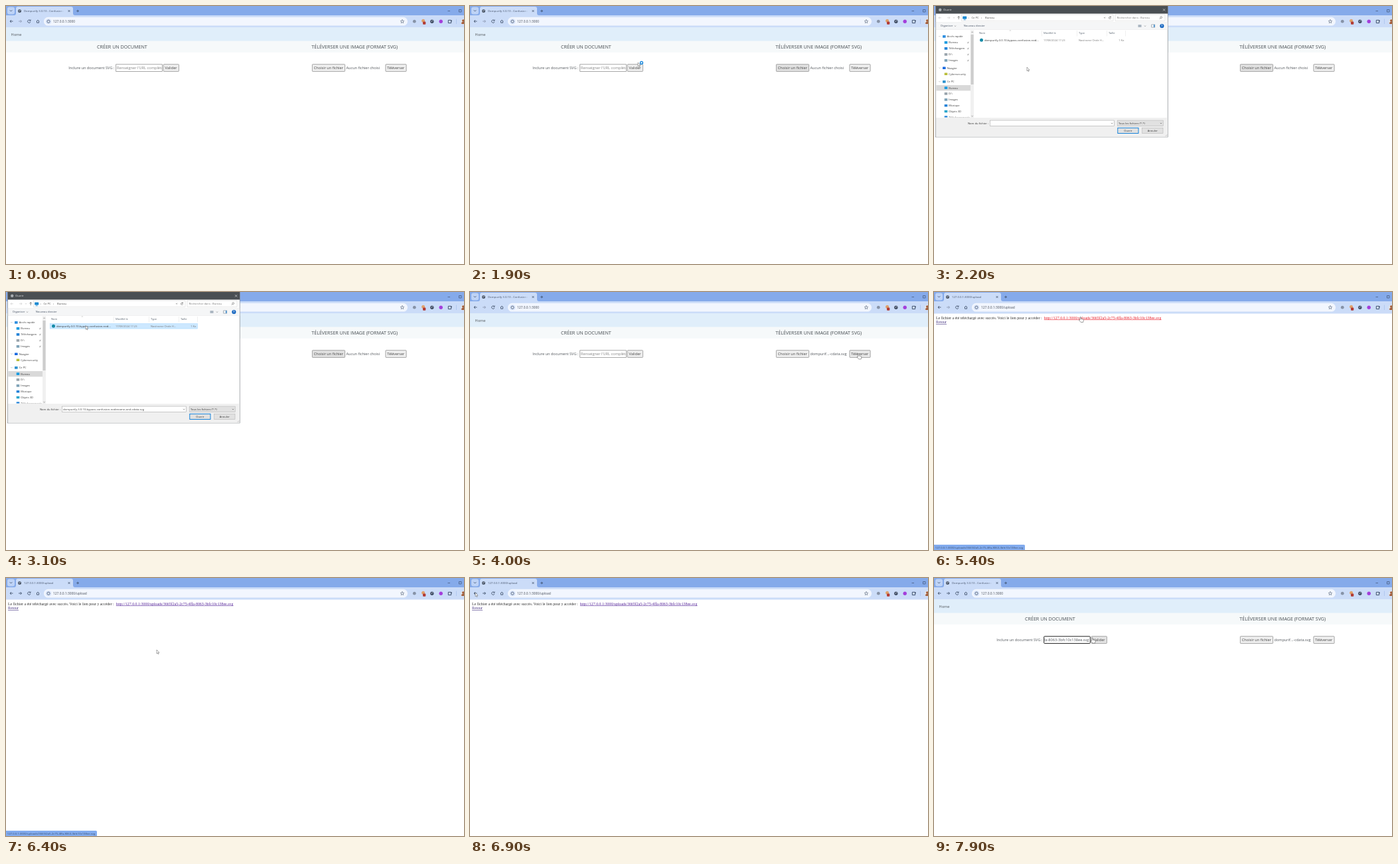
Animation, 690 px wide and 388 px high, one loop 8000 ms. Source, as an HTML page:

```html
<!DOCTYPE html>
<html lang="fr">
<head>
<meta charset="utf-8">
<title>Upload SVG</title>
<style>
html, body { margin: 0; width: 100%; height: 100%; overflow: hidden; background: #fff; }
svg { display: block; font-family: "Open Sans", "Noto Sans", sans-serif; }
.serif { font-family: "Liberation Serif", "Times New Roman", serif; }
</style>
</head>
<body>
<svg id="stage" width="690" height="388" viewBox="0 0 690 388"></svg>
<script>
const LOOP = 8000, STEP = 100;
const stage = document.getElementById('stage');
const HOST = '127.0.0.1:3000';
const FILE = HOST + '/uploads/3665f2a5-2c75-4ffa-8063-3bfc10c138ee.svg';
const INK = '#50555a';

// Drawing helpers; text is placed by its left edge and vertical middle
const rect = (x, y, w, h, fill, more = '') =>
  `<rect x="${x}" y="${y}" width="${w}" height="${h}" fill="${fill}" ${more}/>`;
const dot = (x, y, r, fill, more = '') =>
  `<circle cx="${x}" cy="${y}" r="${r}" fill="${fill}" ${more}/>`;
const line = (d, color = '#3c4450', w = 0.8, more = '') =>
  `<path d="${d}" fill="none" stroke="${color}" stroke-width="${w}" ${more}/>`;
const text = (x, y, str, size, fill = INK, more = '') =>
  `<text x="${x}" y="${y + size * 0.36}" font-size="${size}" fill="${fill}" ${more}>${str}</text>`;
const clip = (id, x, y, w, h) => `<clipPath id="${id}">${rect(x, y, w, h, '#000')}</clipPath>`;
const within = (t, a, b) => t >= a && t < b;

const DEFS = '<defs>' + clip('tab', 26, 0, 62, 14) + clip('field', 166.3, 86, 68.4, 14) +
  clip('side', 3, 36, 52, 131.5) + clip('bar', 70, 16, 510, 15) +
  '<linearGradient id="fade"><stop offset="0" stop-color="#cbdcf8" stop-opacity="0"/>' +
  '<stop offset="1" stop-color="#cbdcf8"/></linearGradient></defs>';

// Cursor path: time, x, y
const PATH = [
  [500, 610, 236], [1300, 487, 92], [1400, 487, 92], [1900, 253, 85],
  [2200, 140, 92], [2700, 120, 50.5], [3100, 120, 50.5], [4000, 584.5, 93],
  [4500, 584.5, 93], [5200, 220, 37.5], [6200, 220, 37.5], [6300, 227, 108],
  [6500, 227, 108], [6900, 8, 22], [7000, 8, 22], [7400, 203, 94],
  [7600, 203, 94], [7700, 222, 131], [7900, 237.8, 90]
];

function cursorAt(t) {
  const i = PATH.findIndex(p => p[0] > t);
  if (i < 0) return PATH[PATH.length - 1].slice(1);
  const [a, b] = [PATH[i - 1], PATH[i]];
  const k = (t - a[0]) / (b[0] - a[0]), e = k * k * (3 - 2 * k);
  return [a[1] + (b[1] - a[1]) * e, a[2] + (b[2] - a[2]) * e];
}

function cursor(t) {
  if (t < 500) return '';
  const [x, y] = cursorAt(t);
  const hand = within(t, 3900, 4100) || within(t, 5200, 5500) || within(t, 6000, 6200) || t >= 7900;
  let art;
  if (within(t, 7400, 7700)) {
    art = line('M-1.2-3H1.2M0-3V3M-1.2 3H1.2', '#333', 0.5);
  } else if (hand) {
    art = '<path d="M0 .2Q.8-.5 1.5.3V3L4.6 3.6Q5.5 4 5.3 5L4.7 8H1.2L-1.6 4.8Q-1.4 3.8-.1 4.6Z" ' +
      'fill="#fff" stroke="#444" stroke-width=".5"/>';
  } else {
    art = '<path d="M0 0V5.7L1.3 4.5 2.2 6.5 3.1 6.1 2.3 4.2H4Z" fill="#fff" stroke="#444" stroke-width=".45"/>';
    if (within(t, 1400, 2000)) art += dot(5.4, 0.4, 2, '#d6efff', 'stroke="#1583d8" stroke-width="1.3"');
  }
  return `<g transform="translate(${x.toFixed(2)} ${y.toFixed(2)})">${art}</g>`;
}

function globe(x, y, r, color) {
  return dot(x, y, r, color) +
    line(`M${x - r * 0.6} ${y - r * 0.2}l${r * 0.7} ${r * 0.4}M${x} ${y - r * 0.6}l${r * 0.6} ${r * 0.3}`, '#dfe9fa', 0.7);
}

function browser(title, url, forward) {
  const dark = '#34445e';
  return rect(0, 0, 690, 15, '#85aaea') + rect(2, 1.5, 11, 11, '#bed3f6', 'rx="3"') +
    line('M5.8 6.3L7.5 8 9.2 6.3', dark) +
    '<path d="M12 14Q15 14 15 11V4Q15 1 18 1H98Q101 1 101 4V11Q101 14 104 14Z" fill="#cbdcf8"/>' +
    rect(0, 14, 690, 18.5, '#cbdcf8') + globe(20.5, 7.5, 2.5, '#4a5566') +
    text(27, 7.5, title, 4.25, '#46536a', 'clip-path="url(#tab)"') +
    rect(80, 2, 8, 11, 'url(#fade)') +
    line('M93.5 6L96.5 9M96.5 6L93.5 9', dark, 0.7) + line('M106.2 7.5H110M108.1 5.6V9.4', dark, 0.7) +
    line('M665.5 7.5H669', dark, 0.6) + line('M682.5 5.5H686V9H682.5Z', dark, 0.6) +
    line('M10.5 23H6M8 21L6 23 8 25', dark) +
    line('M19 23H23.5M21.5 21L23.5 23 21.5 25', forward ? dark : '#8794ab') +
    line('M36.6 21.8A2.2 2.2 0 1 0 36.9 23.8M37 20.4V22.2H35.2', dark) +
    line('M46 23L48 21 50 23M46.5 22.7V25.2H49.5V22.7', dark) +
    rect(57, 16.8, 548, 12.8, '#f2f6fe', 'rx="6.4"') +
    dot(64, 23.2, 4.3, '#d9e5fa') + dot(64, 23.2, 2.1, 'none', 'stroke="#59667c" stroke-width=".9"') +
    text(71, 23.2, url, 4.88, '#454c57', 'clip-path="url(#bar)"') +
    line('M597 20.4L597.8 22.2 599.7 22.4 598.3 23.7 598.7 25.6 597 24.6 595.3 25.6 595.7 23.7 594.3 22.4 596.2 22.2Z', '#4c596f', 0.6) +
    dot(615.3, 23.2, 2.4, '#8793a7') + dot(628.6, 22.2, 2.5, '#dfa16d') +
    rect(628, 23.6, 4.3, 4.2, '#b23a33', 'rx="1"') +
    globe(641.8, 23.2, 2.7, '#3e4b61') + dot(655.2, 23.2, 2.7, '#a43fdb') +
    line('M666.3 21.3H670.7V25.6H666.3Z', dark, 0.9) + dot(671, 22.4, 0.8, dark) +
    line('M678.5 19.5V27', '#9fbbe9', 0.6) +
    dot(688.8, 23.4, 4, '#dfe3e8') + dot(688.8, 22, 1.8, '#a35b37') +
    '<path d="M685.6 25.8Q688.8 22.6 690 24V27H687Z" fill="#a35b37"/>';
}

const button = (x, w, label, fill, size = 5.6) =>
  rect(x + 0.4, 87.7, w - 0.8, 10.7, fill, 'stroke="#858585" stroke-width=".7" rx=".7"') +
  text(x + 2.8, 93.2, label, size, '#444');

function home(t) {
  const pasted = t >= 7800, focus = t >= 7500;
  const chosen = t >= 3300;
  return rect(0, 32.3, 690, 20.5, '#e0eefa') + rect(0, 52.8, 690, 17, '#f6f9fa') +
    text(7.5, 42.8, 'Home', 5.65) +
    text(137, 61.8, 'CRÉER UN DOCUMENT', 7.15, '#484e53') +
    text(460.3, 61.8, 'TÉLÉVERSER UNE IMAGE (FORMAT SVG)', 7.13, '#484e53') +
    text(94.2, 93.2, 'Inclure un document SVG :', 5.62) +
    rect(165.7, 87.8, 69.6, 10.6, '#fff',
      focus ? 'stroke="#222" stroke-width="1" rx=".8"' : 'stroke="#858585" stroke-width=".7"') +
    (pasted
      ? text(233.4, 93.2, 'http://' + FILE, 5.63, INK, 'text-anchor="end" clip-path="url(#field)"')
      : text(167, 93.2, 'Renseigner l’URL complète', 5.68, '#858585', 'clip-path="url(#field)"')) +
    button(236.8, 24, 'Valider', t >= 7900 ? '#e4e4e4' : '#efefef') +
    button(461, 50, 'Choisir un fichier', within(t, 1300, 3300) ? '#e1e1e1' : '#efefef') +
    text(512.5, 93.2, chosen ? 'dompurif...-cdata.svg' : 'Aucun fichier choisi', 5.6) +
    button(571.5, 32, 'Téléverser', within(t, 3900, 4100) ? '#e9e9e9' : '#efefef', 5.45);
}

function upload(t) {
  const color = t < 5400 ? '#1a1aee' : t < 5500 ? '#e8202c' : '#5a2a9c';
  const under = 'class="serif" text-decoration="underline"';
  const status = t === 5400 || within(t, 6000, 6600);
  return text(3, 38.4, 'Le fichier a été téléchargé avec succès. Voici le lien pour y accéder :', 5.87, '#333', 'class="serif"') +
    text(165.8, 38.4, 'http://' + FILE, 5.9, color, under) +
    text(3, 45, 'Retour', 5.88, '#4c3a86', under) +
    (status ? '<path d="M0 380H135.5Q137 380 137 381.5V388H0Z" fill="#82abee"/>' +
      text(1.8, 384.3, FILE, 4.24, '#3d5474') : '');
}

function menu(x, y, w, items, hot) {
  const row = 13;
  return rect(x, y, w, items.length * row, '#fff', 'stroke="#c6cbd3" stroke-width=".6" rx="2"') +
    items.map((s, i) =>
      (i === hot ? rect(x + 0.4, y + i * row, w - 0.8, row, '#e6e9ed') : '') +
      text(x + 8, y + (i + 0.5) * row, s, 4.3, '#333')).join('');
}

const LINK_MENU = ['Ouvrir le lien dans un nouvel onglet', 'Ouvrir le lien dans une nouvelle fenêtre',
  'Ouvrir le lien en navigation privée', 'Envoyer le lien à vos appareils',
  'Enregistrer le lien sous...', 'Copier l’adresse du lien', 'Inspecter'];
const FIELD_MENU = ['Emoji', 'Annuler', 'Coller', 'Coller en texte brut', 'Tout sélectionner',
  'Orthographe', 'Inspecter'];

// Sidebar: label, middle, indent, icon colour
const PLACES = [
  ['Accès rapide', 46, 0, '#2f8fe0'], ['Bureau', 55, 1, '#1a9be0'], ['Téléchargem', 64, 1, '#2583d8'],
  ['D:\\', 73, 1, '#9aa5ad'], ['Images', 82, 1, '#7fa3b8'], ['Nuagier', 93.4, 0, '#1769e0'],
  ['Cybersecurity', 102.4, 1, '#b9bd3a'], ['Ce PC', 114, 0, '#2f93cf'], ['Bureau', 123.2, 1, '#1a9be0'],
  ['D:\\', 132, 1, '#9aa5ad'], ['Images', 141, 1, '#7fa3b8'], ['Musique', 149.8, 1, '#2583d8'],
  ['Objets 3D', 158.6, 1, '#2ba6cc'], ['Téléchargements', 167.2, 1, '#2583d8']
];

function sidebar() {
  return '<g clip-path="url(#side)">' + rect(3.5, 119, 51.5, 8.4, '#d9d9d9') +
    PLACES.map(([label, y, sub, color], i) => {
      const x = sub ? 18 : 15.3;
      return rect(x - 2.3, y - 1.9, 4.6, 3.6, color, 'rx=".5"') +
        (sub ? '' : line(`M7.4 ${y - 0.8}l1 1 1-1`, '#888', 0.5)) +
        text(sub ? 22.3 : 19.8, y, label, 4.05, '#3c3c3c') +
        (i > 0 && i < 5 ? line(`M50.2 ${y + 1.2}l2.4-2.4M50.6 ${y - 0.8}l1.8 1.8`, '#777', 0.6) : '');
    }).join('') + '</g>' +
    rect(55, 36.5, 5, 131.5, '#f0f0f0') + rect(55.4, 43, 4.2, 75, '#cdcdcd') +
    line('M56.4 40L57.6 38.8 58.8 40M56.4 165L57.6 166.2 58.8 165', '#666', 0.6);
}

function dialog(t) {
  const named = t >= 2600, hover = t >= 2500;
  const ink = '#484848', frame = 'stroke="#cfcfcf" stroke-width=".5"';
  const head = [['Nom', 68], ['Modifié le', 165], ['Type', 218], ['Taille', 263]];
  const row = (hover ? rect(66.3, 47.7, 222, 7.4, named ? '#cce8ff' : '#e5f3ff',
    named ? 'stroke="#99d1ff" stroke-width=".5"' : '') : '') +
    dot(71.5, 51.3, 2.5, '#168ba8') +
    text(76, 51.3, 'dompurify-3.0.10-bypass-confusion-nod...', 4.22, '#333') +
    text(165, 51.3, '17/08/2024 17:23', 4.0, '#777') +
    text(218, 51.3, 'Navitrame Onde H...', 4.0, '#777') +
    text(286.5, 51.3, '1 Ko', 4.0, '#777', 'text-anchor="end"');
  return rect(2.6, 0, 349.6, 197, '#fff', 'stroke="#72777c" stroke-width=".6"') +
    rect(2.6, 0, 349.6, 11.5, '#4a4f53') + dot(9.2, 5.8, 2.2, '#a9aeb2') +
    text(14, 5.8, 'Ouvrir', 4.2, '#f2f2f2') + line('M345 4.2L348.2 7.4M348.2 4.2L345 7.4', '#eee', 0.6) +
    line('M11 17.7H7M8.7 16L7 17.7 8.7 19.4M20 17.7H24M22.3 16L24 17.7 22.3 19.4', '#c4c4c4', 0.6) +
    line('M29 17.2l1 1 1-1', '#999', 0.5) + line('M37.2 20V15.6M35.5 17.3L37.2 15.6 38.9 17.3', '#555', 0.7) +
    rect(41.5, 13, 228.5, 9.6, '#fff', frame) + rect(43.2, 15.4, 6, 4, '#1787d0', 'rx=".5"') +
    line('M46.2 19V20.8M44.6 20.8H47.8', '#1787d0', 0.6) +
    text(51.6, 17.6, '›', 4.2, ink) + text(56.5, 17.6, 'Ce PC', 4.15, ink) +
    text(71, 17.6, '›', 4.2, ink) + text(77, 17.6, 'Bureau', 4.15, ink) +
    line('M256 17l1.2 1.2 1.2-1.2', '#555', 0.6) +
    line('M266.3 16.6A1.6 1.6 0 1 0 266.6 18.3M266.5 15.5V17H265', '#555', 0.6) +
    rect(273, 13, 75, 9.6, '#fff', frame) + text(275.8, 17.6, 'Rechercher dans : Bureau', 4.12, '#747474') +
    dot(342.2, 17.1, 1.4, 'none', 'stroke="#555" stroke-width=".5"') + line('M341.2 18.1L339.8 19.6', '#555', 0.6) +
    rect(3, 24.4, 349, 11.4, '#f5f6f7', 'stroke="#e6e6e6" stroke-width=".4"') +
    text(9.8, 30, 'Organiser', 4.05, '#445063') + line('M31 29.6l1 1 1-1', '#555', 0.6) +
    text(44.8, 30, 'Nouveau dossier', 4.07, '#445063') +
    rect(307.5, 28.2, 5, 3.6, '#a8b4bf') + line('M317 29.6l1 1 1-1', '#555', 0.6) +
    rect(327.8, 28, 5, 4, '#fff', 'stroke="#567" stroke-width=".5"') + rect(330.8, 28, 2, 4, '#5b9bd0') +
    dot(343.4, 30, 3.1, '#1565c0') + text(343.4, 30, '?', 4.3, '#fff', 'text-anchor="middle" font-weight="700"') +
    sidebar() +
    head.map(([s, x]) => text(x, 41, s, 4.1, '#56616e')).join('') +
    line('M162.5 37V45.5M215.5 37V45.5M260.5 37V45.5M288.5 37V45.5', '#e0e0e0', 0.5) +
    line('M113.6 37.6l1.2-1.1 1.2 1.1', '#888', 0.4) + row +
    rect(3, 168, 349, 28.7, '#f0f0f0') + text(51, 176.2, 'Nom du fichier :', 4.15, '#333') +
    rect(84.3, 172, 187, 8.6, '#fff', 'stroke="#9a9a9a" stroke-width=".5"') +
    (named ? text(86, 176.2, 'dompurify-3.0.10-bypass-confusion-nodename-and-cdata.svg', 4.27, '#444') : '') +
    rect(276.3, 172, 68.9, 8.6, '#e1e1e1', 'stroke="#adadad" stroke-width=".5"') +
    text(278, 176.2, 'Tous les fichiers (*.*)', 4.15, '#333') +
    line('M267 175.8l1.2 1.2 1.2-1.2M340.8 175.8l1.2 1.2 1.2-1.2', '#555', 0.6) +
    rect(276.8, 183.3, 31.2, 8.2, '#e1e1e1', 'stroke="#0078d7" stroke-width=".9"') +
    text(292.4, 187.3, 'Ouvrir', 4.1, '#333', 'text-anchor="middle"') +
    rect(313.6, 183.2, 31.4, 8.4, '#e1e1e1', 'stroke="#adadad" stroke-width=".5"') +
    text(329.3, 187.3, 'Annuler', 4.1, '#333', 'text-anchor="middle"') +
    line('M348.5 196l3-3M350.2 196l1.3-1.3', '#aaa', 0.5);
}

function render(t) {
  const isHome = t < 4100 || t >= 7000, isFile = within(t, 5500, 5900);
  const url = isHome ? HOST : isFile ? FILE : HOST + '/upload';
  const title = isHome ? 'Dompurify 3.0.10 - Confusion nodename' : url;
  let art = DEFS + browser(title, url, t >= 5900);
  if (isHome) art += home(t);
  else if (!isFile) art += upload(t);
  if (within(t, 2000, 3200)) art += dialog(t);
  if (within(t, 6200, 6400)) art += menu(221, 41, 132, LINK_MENU, t === 6300 ? 5 : -1);
  if (within(t, 7500, 7800)) art += menu(203, 95, 82, FIELD_MENU, t === 7700 ? 2 : -1);
  stage.innerHTML = art + cursor(t);
}

const start = performance.now();
let shown = -1;
function tick(now) {
  const t = Math.floor((Math.max(0, now - start) % LOOP) / STEP) * STEP;
  if (t !== shown) render(shown = t);
  requestAnimationFrame(tick);
}
tick(start);
</script>
</body>
</html>
```
